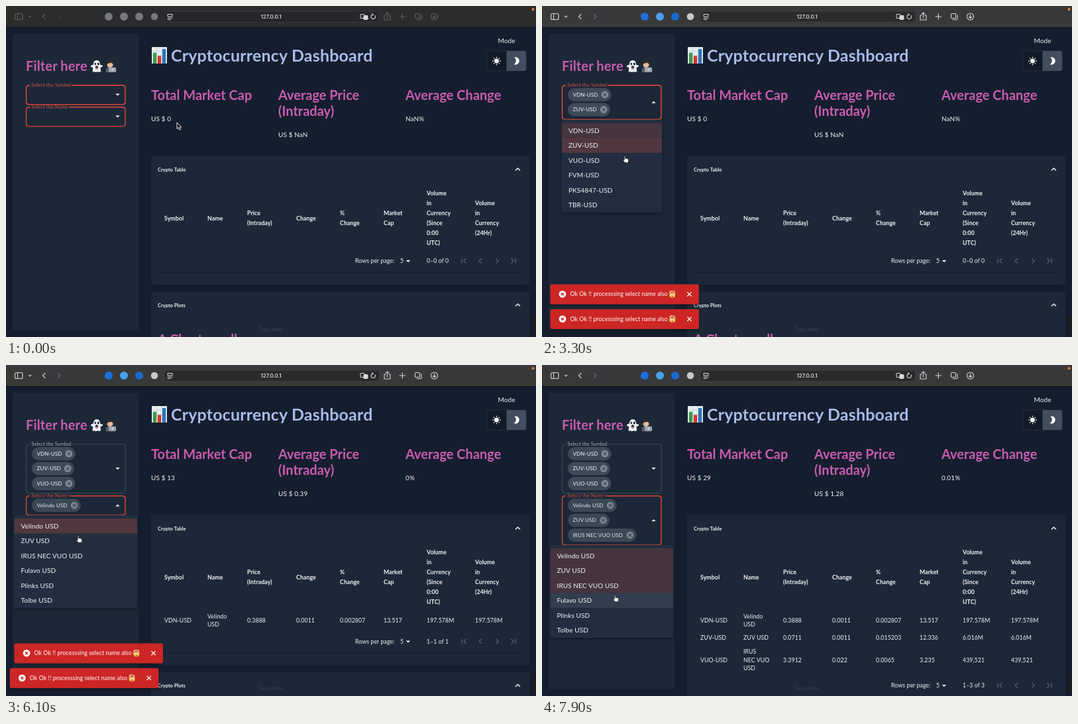
Animation, 800 px wide and 500 px high, one loop 8000 ms. Source, as an HTML page:

```html
<!DOCTYPE html>
<html lang="en">
<head>
<meta charset="utf-8">
<title>Cryptocurrency Dashboard</title>
<style>
html, body { margin: 0; width: 100%; height: 100%; overflow: hidden; background: #151e2e; }
svg#stage { display: block; width: 800px; height: 500px; font-family: Lato, "Open Sans", sans-serif; }
text { white-space: pre; letter-spacing: .01em; }
.line { fill: none; stroke: #d6d7d9; stroke-width: 1.1; stroke-linecap: round; stroke-linejoin: round; }
.bold, .title, .head { font-weight: 700; }
.title { letter-spacing: .0074em; }
.head { letter-spacing: 0; }
.url { font-family: Inter, Roboto, sans-serif; font-weight: 500; letter-spacing: 0; }
</style>
</head>
<body>
<svg id="stage" viewBox="0 0 800 500">
  <defs>
    <filter id="shade" x="-10%" y="-10%" width="120%" height="130%">
      <feDropShadow dx="0" dy="2" stdDeviation="2.5" flood-color="#000" flood-opacity=".4"/>
    </filter>
    <symbol id="chart" viewBox="0 0 24 26">
      <rect width="24" height="26" rx="1" fill="#e6eef0"/>
      <path d="M0 6.5H24M0 13H24M0 19.5H24M8 0V26M16 0V26" stroke="#b9cbd1" stroke-width=".7"/>
      <rect x="2" y="9" width="5.5" height="17" fill="#3f9a48"/>
      <rect x="9.3" y="14" width="5.5" height="12" fill="#d8352f"/>
      <rect x="16.6" y="3" width="5.5" height="23" fill="#2c76ba"/>
    </symbol>
    <symbol id="ghost" viewBox="0 0 20 20">
      <path d="M10 1C6 1 5 4.500 4.600 8C2.500 8 .8 8.500 1 10.500C2 12 3.500 11.500 4.200 11.800C4 15 3 17 4.500 19C6 18 7 18 8 19C9.500 19.500 10.500 17.500 12 18.500C13.500 19.500 15.500 19 16.500 17C15.500 15 15.700 13 15.700 11.800C17.500 11.500 19.500 11 19 9C18 7.500 16.500 8.500 15.400 8C15 4.500 14 1 10 1Z" fill="#eceef2"/>
      <ellipse cx="7.800" cy="6.500" rx="1.200" ry="1.700" fill="#23272e"/>
      <ellipse cx="12.300" cy="6.500" rx="1.500" ry="2" fill="#23272e"/>
      <ellipse cx="10" cy="11.800" rx="2.200" ry="2.600" fill="#23272e"/>
      <ellipse cx="10" cy="13" rx="1.400" ry="1.200" fill="#dd5b68"/>
    </symbol>
    <symbol id="coder" viewBox="0 0 20 20">
      <path d="M3 20V15Q4 11.500 10 11.500T17 15V20Z" fill="#57606a"/>
      <circle cx="9.500" cy="7.500" r="4.800" fill="#e4bb9b"/>
      <path d="M4.300 8C3.500 3 6 1 10 1S15.500 4 14.700 8Q14 5 11 4.800Q6 5 4.300 8Z" fill="#3c2a22"/>
      <rect x="7.500" y="11.800" width="11.500" height="7.500" rx="1" fill="#a2a8ae"/>
      <circle cx="13.300" cy="15.500" r="1.200" fill="#e6e8ea"/>
    </symbol>
    <symbol id="mindblown" viewBox="0 0 20 20">
      <path d="M4 8Q0 6 3 3Q5 0 10 .8Q16 0 17.500 4Q19 7 15.500 8.500Z" fill="#e9b28a"/>
      <path d="M6 7Q5 3 10 3T14 7Z" fill="#c8553a"/>
      <path d="M2 9Q5 7 7 8.500Q10 6.500 13 8.500Q15 7 18 9Q19 19 10 19.500Q1 19 2 9Z" fill="#f3c24c"/>
      <circle cx="6.800" cy="12" r="1.900" fill="#fff"/><circle cx="13.200" cy="12" r="1.900" fill="#fff"/>
      <circle cx="6.800" cy="12" r=".8" fill="#402a18"/><circle cx="13.200" cy="12" r=".8" fill="#402a18"/>
      <ellipse cx="10" cy="16.300" rx="1.700" ry="1.500" fill="#633719"/>
    </symbol>
    <symbol id="arrow" viewBox="0 0 10 14" overflow="visible">
      <path d="M0 0V9.600L2.200 7.600L3.700 11L5.500 10.200L4 6.900H6.900Z" fill="#111" stroke="#fff" stroke-width=".9"/>
    </symbol>
    <symbol id="hand" viewBox="0 0 10 14" overflow="visible">
      <path d="M-.8 1Q0 -.6 .9 1V4.200Q2 3.600 2.700 4.500Q3.800 4 4.300 5Q5.700 4.800 5.700 6.200V8Q5.500 9.500 4.800 10.800H0Q-1 8.800 -2.800 7.200Q-2.600 5.800 -.8 6.900Z" fill="#fff" stroke="#111" stroke-width=".8"/>
    </symbol>
  </defs>
  <g id="view"></g>
</svg>
<script>
const LOOP = 8000, STEP = 100, LAG = 150, ROW = 22.5;
const PAPER = '#1c2838', RED = '#f54a35', PINK = '#c95cb0';

const tickers = ['VDN-USD', 'ZUV-USD', 'VUO-USD', 'FVM-USD', 'PKS4847-USD', 'TBR-USD'];
const coins = ['Velindo USD', 'ZUV USD', 'IRUS NEC VUO USD', 'Fulavo USD', 'Plinks USD', 'Tolbe USD'];
const pick1 = [2330, 3000, 3780];
const pick2 = [5950, 6600, 7450];
const open1 = 1511, close1 = 4500, open2 = 5100;

const rows = [
  { h: 32.5, name: ['Velindo', 'USD'], cells: ['0.3888', '0.0011', '0.002807', '13.517', '197.578M', '197.578M'] },
  { h: 20, name: ['ZUV USD'], cells: ['0.0711', '0.0011', '0.015203', '12.336', '6.016M', '6.016M'] },
  { h: 46.5, name: ['IRUS', 'NEC VUO', 'USD'], cells: ['3.3912', '0.022', '0.0065', '3.235', '439,521', '439,521'] }
];
const totals = [['0', 'NaN', 'NaN'], ['13', '0.39', '0'], ['25', '0.23', '0.01'], ['29', '1.28', '0.01']];
const columns = [
  [239, 'Symbol'], [304, 'Name'], [364, 'Price|(Intraday)'], [438, 'Change'], [504, '%|Change'],
  [570, 'Market|Cap'], [635, 'Volume|in|Currency|(Since|0:00|UTC)'], [708, 'Volume|in|Currency|(24Hr)']
];
// time, x, y of the pointer tip
const path = [
  [0, 258, 176], [800, 258, 176], [1400, 163, 137], [1700, 163, 137], [2200, 112, 166], [2400, 112, 166],
  [2800, 120, 189], [3000, 120, 189], [3300, 125, 226], [3500, 125, 230], [3850, 125, 230],
  [4200, 174, 156], [4600, 174, 156], [5000, 150, 210], [5150, 150, 210], [5400, 120, 263],
  [5650, 120, 263], [5900, 109, 244], [6000, 109, 244], [6200, 109, 271], [6700, 109, 271],
  [7000, 109, 288], [7100, 109, 288], [7200, 109, 307], [7500, 109, 307], [7700, 110, 347], [8000, 110, 347]
];

const clamp = v => Math.max(0, Math.min(1, v));
const mix = (a, b, p) => a + (b - a) * p;
const count = (times, t) => times.filter(at => t >= at).length;

// cubic-bezier(.4, 0, .2, 1)
function ease(x) {
  x = clamp(x);
  let lo = 0, hi = 1, u = x;
  for (let i = 0; i < 20; i++) {
    u = (lo + hi) / 2;
    const at = 1.2 * u * (1 - u) ** 2 + .6 * u * u * (1 - u) + u ** 3;
    if (at < x) lo = u; else hi = u;
  }
  return 3 * u * u * (1 - u) + u ** 3;
}

function pointer(t) {
  const i = Math.max(1, path.findIndex(p => p[0] > t));
  const a = path[i - 1], b = path[i];
  const p = clamp((t - a[0]) / (b[0] - a[0])), s = p * p * (3 - 2 * p);
  return { x: mix(a[1], b[1], s), y: mix(a[2], b[2], s) };
}

const pen = document.createElement('canvas').getContext('2d');
function widthOf(str, size) {
  pen.font = `${size * 10}px Lato, "Open Sans", sans-serif`;
  return pen.measureText(str).width / 10 + str.length * size * .01;
}

// text placed by the middle of its capitals
const text = (x, mid, str, size, fill = '#f2f4f7', extra = '') =>
  `<text x="${x}" y="${mid + size * .36}" font-size="${size}" fill="${fill}" ${extra}>${str}</text>`;
const bold = (x, mid, str, size, fill) => text(x, mid, str, size, fill, 'class="bold"');
const title = (x, mid, str, size, fill) => text(x, mid, str, size, fill, 'class="title"');
const head = (x, mid, str) => text(x, mid, str, 20, PINK, 'class="head"');
const rect = (x, y, w, h, r, fill, extra = '') =>
  `<rect x="${x}" y="${y}" width="${w}" height="${h}" rx="${r}" fill="${fill}" ${extra}/>`;
const circle = (x, y, r, fill) => `<circle cx="${x}" cy="${y}" r="${r}" fill="${fill}"/>`;
const stroke = (d, color = '#fff', w = 1.2) => `<path d="${d}" fill="none" stroke="${color}" stroke-width="${w}"/>`;
const cross = (x, y, r, color, w) => stroke(`M${x - r} ${y - r}l${2 * r} ${2 * r}m0 ${-2 * r}l${-2 * r} ${2 * r}`, color, w);
const use = (id, x, y, w, h) => `<use href="#${id}" x="${x}" y="${y}" width="${w}" height="${h}"/>`;
const lines = (x, mid, list, gap, draw) =>
  list.map((s, i) => draw(x, mid + (i - (list.length - 1) / 2) * gap, s, 8.75)).join('');
const triangle = (x, y, up) => {
  const d = up ? -1.6 : 1.6;
  return `<path d="M${x - 3.2} ${y - d}h6.4L${x} ${y + d}Z" fill="#fff"/>`;
};

function toolbar(active) {
  const dim = active ? 1 : .3;
  const marks = active ? ['#1f6fdc', '#4a9fe6', '#1c68cc', '#c9cacc'] : Array(4).fill('#77797c');
  return rect(0, 0, 800, 32, 0, active ? '#38393b' : '#2b2c2e') + rect(0, 32, 800, 1, 0, '#0d1119')
    + `<g class="line" opacity="${dim}">
      <rect x="13.500" y="11.500" width="11.500" height="9" rx="2"/><path d="M17.500 11.500v9M34.300 15.200l1.800 1.800l1.800 -1.800M59 12.500l-3.500 3.500l3.500 3.500"/>
      <path d="M78.500 12.500l3.500 3.500l-3.500 3.500" opacity=".35"/>
      <path d="M573 14h-2v7h9v-7h-2M575.500 18v-8m-2.300 2.200l2.300 -2.300l2.300 2.300M594 16h8.500M598.250 11.800v8.500"/>
      <rect x="617.500" y="11.500" width="7" height="7" rx="1.500"/><path d="M620 20.800h5.500q1.500 0 1.500 -1.500v-5.500"/>
      <circle cx="646.500" cy="16" r="5"/><path d="M646.500 13v5.500m-2 -2l2 2l2 -2"/></g>`
    + marks.map((c, i) => circle(155 + i * 23, 16, i === 3 ? 5.3 : 6, c)).join('')
    + rect(239, 8, 325, 16.5, 4.5, active ? '#2a2b2d' : '#252628', 'stroke="#48494c" stroke-width=".5"')
    + `<g class="line"><rect x="244" y="12.500" width="7" height="3.500" rx=".8"/><path d="M244 18.300h7M244 20.500h4.500"/>
      <rect x="535" y="12.500" width="6" height="6" rx="1.200"/><rect x="540" y="14.500" width="6" height="6" rx="1.200" fill="#d6d7d9"/>
      <path d="M557 14.500a3.300 3.300 0 1 1 -2.800 -1.500l-1.200 -1.500m1.200 1.500l-1.500 1.200"/></g>`
    + text(400, 16.3, '127.0.0.1', 8, '#f0f0f1', 'class="url" text-anchor="middle"')
    + circle(795.5, 5, 2, '#ee8433');
}

function modeSwitch() {
  let rays = '';
  for (let i = 0; i < 8; i++) {
    const c = Math.cos(i * Math.PI / 4), s = Math.sin(i * Math.PI / 4);
    rays += `M${740.5 + 4.6 * c} ${83 + 4.6 * s}L${740.5 + 6.2 * c} ${83 + 6.2 * s}`;
  }
  return text(742.5, 52.6, 'Mode', 10)
    + rect(726, 68, 59, 30, 3, '#121a28', 'stroke="#2b3646" stroke-width=".7"')
    + `<path d="M755.500 68H782q3 0 3 3V95q0 3 -3 3H755.500Z" fill="#424e5d"/>`
    + circle(740.5, 83, 3.4, '#fff') + stroke(rays, '#fff', 1.3)
    + `<path d="M767.500 77.500a5.700 5.700 0 1 1 -1 10.600a6.400 6.400 0 0 0 1 -10.600Z" fill="#fff"/>`;
}

const card = (y, h, label) => rect(219, y, 571, h, 4, PAPER)
  + bold(229, y + 20.5, label, 7.4) + stroke(`M769 ${y + 22}l3.500 -3.500l3.500 3.500`, '#fff', 1.4);

function main(n) {
  const [cap, price, change] = totals[n];
  const shown = rows.slice(0, n);
  const extra = shown.reduce((sum, r) => sum + r.h, 0);
  const foot = 385 + extra;
  let out = use('chart', 220, 62, 23, 25) + title(249, 75, 'Cryptocurrency Dashboard', 25, '#a9bbea')
    + head(219, 135, 'Total Market Cap') + head(411, 135, 'Average Price')
    + head(411, 159, '(Intraday)') + head(603, 135, 'Average Change')
    + text(219, 170.3, 'US $ ' + cap, 10) + text(411, 194.3, 'US $ ' + price, 10) + text(603, 170.3, change + '%', 10)
    + card(226.5, 194.5 + extra, 'Crypto Table')
    + columns.map(([x, s]) => lines(x, 320.5, s.split('|'), 15, bold)).join('');
  let top = 369.7;
  shown.forEach((r, i) => {
    const mid = top + r.h / 2;
    out += text(239, mid, tickers[i], 8.75) + lines(304, mid, r.name, 12.6, text)
      + r.cells.map((s, k) => text(columns[k + 2][0], mid, s, 8.75)).join('');
    top += r.h;
  });
  out += rect(230, foot + 16.5, 548, 1.2, 0, '#141c2a')
    + text(527, foot, 'Rows per page:', 8.75) + text(595, foot, '5', 8.75) + triangle(607, foot + .5, false)
    + text(635, foot, `${n ? 1 : 0}–${n} of ${n}`, 8.75)
    + stroke(`M688 ${foot - 3.7}v7.500m6.500 -7.500l-3.700 3.700l3.700 3.700M718 ${foot - 3.7}l-3.700 3.700l3.700 3.700`
      + `M739.500 ${foot - 3.7}l3.700 3.700l-3.700 3.700M762.500 ${foot - 3.7}l3.700 3.700l-3.700 3.700m6.700 -7.500v7.500`, '#596473', 1.2)
    + card(431.5 + extra, 120, 'Crypto Plots') + head(229, 504.2 + extra, 'A Chart on all');
  return out;
}

function chip(y, label) {
  const w = widthOf(label, 8.1), x = 46.5 + w + 10.5;
  return rect(39, y - 10, w + 27.7, 20, 10, '#3e4a58') + text(46.5, y, label, 8.1)
    + circle(x, y, 5.4, '#7f8993') + cross(x, y, 2, '#3e4a58', 1.1);
}

function select(y, h, label, chips, focus, open) {
  const color = focus ? RED : '#4d5967';
  const gap = 38 + widthOf(label, 7.5) + 2, top = y + .7, bottom = y + h - .2;
  return `<path d="M36 ${top}Q30.500 ${top} 30.500 ${top + 4.5}V${bottom - 4.5}Q30.500 ${bottom} 35 ${bottom}H175.500Q180 ${bottom} 180 ${bottom - 4.5}V${top + 4.5}Q180 ${top} 175.500 ${top}H${gap}"
      fill="none" stroke="${color}" stroke-width="${focus ? 1.35 : .8}"/>`
    + text(38.3, y + .3, label, 7.5, focus ? '#d84d3e' : '#aab1ba')
    + chips.map((s, i) => chip(y + 15 + i * ROW, s)).join('')
    + triangle(168.5, y + h / 2, open);
}

function menu(x, y, w, items, picked, hover, t, from, to = Infinity) {
  if (t < from || t > to + 200) return '';
  const s = mix(.75, 1, ease((t - from) / 167));
  const alpha = ease((t - from) / 250) * (1 - ease((t - to) / 200));
  let out = rect(x, y, w, 140, 3, '#242f3f', 'filter="url(#shade)"');
  items.forEach((label, i) => {
    const top = y + 5 + i * ROW, on = i < picked, over = i === hover;
    if (on || over) out += rect(x, top, w, ROW, 0, on ? (over ? '#51383f' : '#46343f') : '#323e4d');
    out += text(x + 10, top + 11.3, label, 10);
  });
  const cx = x + w / 2;
  return `<g opacity="${alpha}" transform="translate(${cx} ${y}) scale(${s} ${s * s}) translate(${-cx} ${-y})">${out}</g>`;
}

function toasts(t) {
  let y = 458, out = '';
  for (const at of pick1) {
    const born = at + 80, gone = born + 3000;
    if (t < born) break;
    const dx = -245 * (1 - ease((t - born) / 225) + ease((t - gone) / 195));
    if (t < gone + 195) {
      const m = y + 14.8;
      out += `<g transform="translate(${dx} 0)">` + rect(12.5, y, 224.5, 30, 3, '#cd2828', 'filter="url(#shade)"')
        + circle(31, m, 5.4, '#fff') + cross(31, m, 2, '#cd2828', 1.3)
        + text(42.5, m, 'Ok Ok !! processsing select name also', 8.75, '#fff')
        + use('mindblown', 191, m - 5.8, 11.5, 11.5) + cross(222.5, m, 3.2, '#fff', 1.2) + '</g>';
    }
    y -= 37.5 * (1 - ease((t - gone - 195) / 300));
  }
  return out;
}

function render(t) {
  const n1 = count(pick1, t), n2 = count(pick2, t), stored = count(pick2, t - 150);
  const h1 = 30 + ROW * Math.max(0, n1 - 1), h2 = 30 + ROW * Math.max(0, n2 - 1);
  const y2 = 122 + h1, menu1 = 119.3 + h1, menu2 = y2 + h2;
  const first = t >= open1 && t < close1, second = t >= open2;

  const was = pointer(t - LAG), now = pointer(t);
  const before = t - LAG;
  const busy = before >= open1 && before < close1 || before >= open2;
  const top = first ? menu1 : menu2;
  const inMenu = busy && (first || second) && was.x < 198 && was.y > top + 5 && was.y < top + 140;
  const hover = inMenu ? Math.floor((was.y - top - 5) / ROW) : -1;
  const inSelect = !busy && was.x > 30 && was.x < 180 && was.y > 119 && was.y < y2 + h2;
  const shape = inMenu || inSelect ? 'hand' : 'arrow';

  return rect(0, 0, 800, 500, 0, '#151e2e') + rect(10, 42, 190, 448, 2, PAPER)
    + main(stored) + modeSwitch()
    + title(30, 91, 'Filter here', 20, PINK) + use('ghost', 127, 81, 20, 20) + use('coder', 148, 81.5, 19, 19)
    + `<g opacity=".93">${select(y2, h2, 'Select the Name', coins.slice(0, n2), true, second)}</g>`
    + select(119, h1, 'Select the Symbol', tickers.slice(0, n1), t < open2, first)
    + text(382, 488, 'Taipy inside', 7, '#3a4453')
    + rect(794, 466, 8, 30, 2, '#1b1c20')
    + menu(30, menu1, 151, tickers, n1, first ? hover : -1, t, open1, close1)
    + menu(12.5, menu2, 185.5, coins, n2, second ? hover : -1, t, open2)
    + toasts(t) + toolbar(t >= 500) + use(shape, now.x, now.y, 10, 14);
}

const view = document.getElementById('view');
const start = performance.now();
let last = -1;
function tick() {
  const t = Math.floor((performance.now() - start) % LOOP / STEP) * STEP;
  if (t !== last) view.innerHTML = render(last = t);
  requestAnimationFrame(tick);
}
tick();
</script>
</body>
</html>
```
